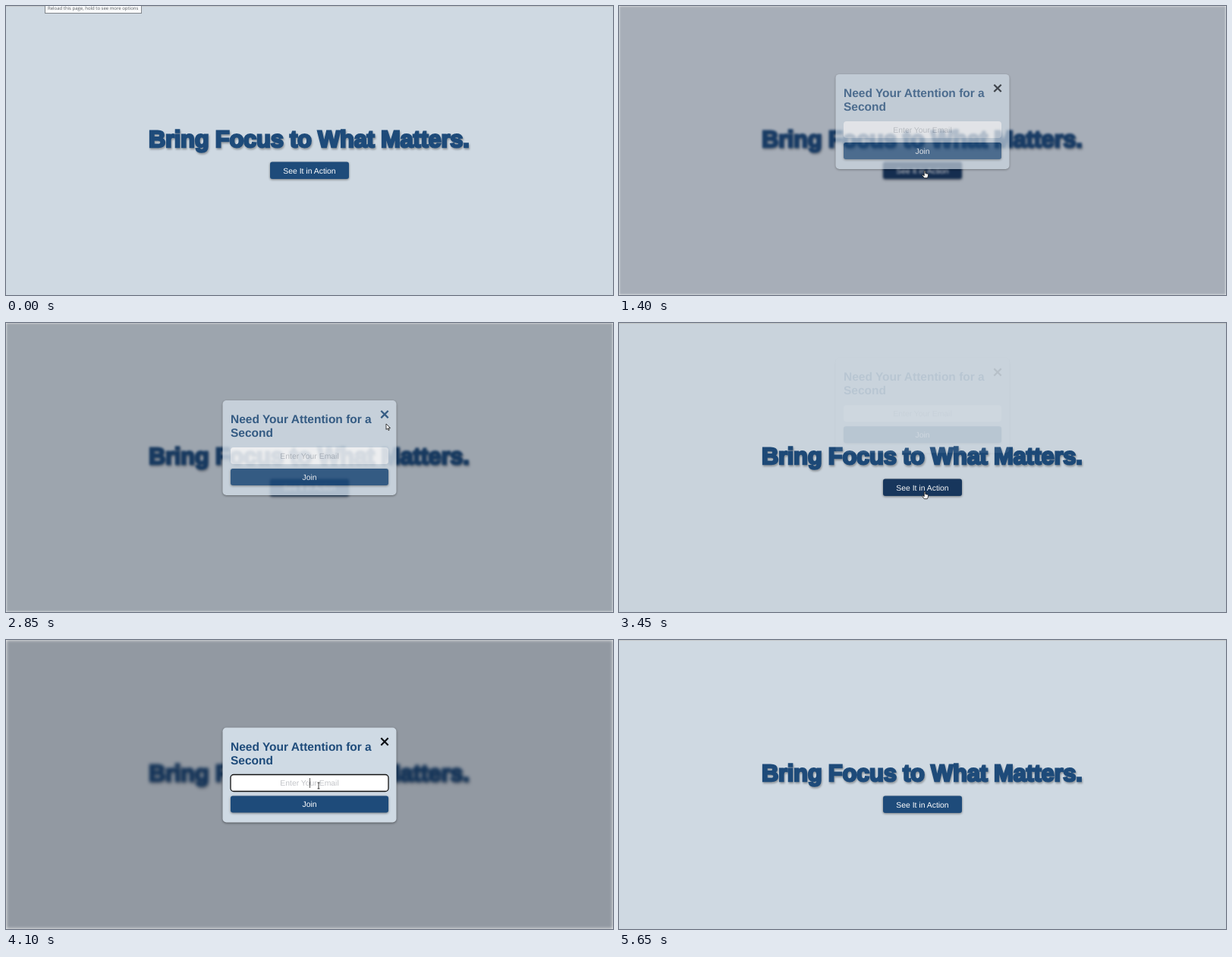
Recreate the animation shown at these times as an HTML page. Size 800 px wide and 381 px high, loop 5.7 s.

```html
<!DOCTYPE html>
<html lang="en">
<head>
<meta charset="utf-8">
<title>Focus modal</title>
<style>
  html, body { margin: 0; width: 100%; height: 100%; overflow: hidden; background: #fff; }
  svg { display: block; width: 800px; height: 381px; }
  text { font: 10.4px "Liberation Sans", Arial, sans-serif; text-rendering: geometricPrecision; }
  .mid { text-anchor: middle; }
  .title { font-size: 31px; font-weight: bold; letter-spacing: -.28px; fill: #1e4b7a; stroke: #1e4b7a;
           stroke-width: 2.4px; filter: drop-shadow(1px 2px 1px rgba(0,0,0,.3)); }
  .button { filter: drop-shadow(0 1px 1.5px rgba(0,0,0,.45)); }
  .heading { font-size: 15.5px; font-weight: bold; fill: #1e4b7a; }
  .tip { font: 6px "Open Sans", "Noto Sans", sans-serif; fill: #555b61; }
  .cursor path { fill: #fff; stroke: #111; stroke-width: .8; stroke-linejoin: round; }
</style>
</head>
<body>
<svg viewBox="0 0 800 381">
  <g id="page">
    <rect width="800" height="381" fill="#cfd9e2"/>
    <rect width="800" height="1" fill="#c4c8ca"/>
    <text class="title" x="187.9" y="186">Bring Focus to What Matters.</text>
    <rect id="action" class="button" x="348" y="205.5" width="104" height="22.5" rx="3"/>
    <text class="mid" x="400" y="220.6" fill="#fff">See It in Action</text>
    <rect id="shade" width="800" height="381" fill="#060410"/>
  </g>
  <g id="modal">
    <rect class="button" x="285.5" y="115.5" width="229" height="125" rx="5" fill="#cfdae4"/>
    <text class="heading" x="296" y="145.6">Need Your Attention for a</text>
    <text class="heading" x="296" y="163.6">Second</text>
    <path id="close" d="M494.3 129.3l9.4 9.4m0-9.4l-9.4 9.4" stroke-width="2.2"/>
    <rect id="field" x="296" y="177.5" width="208" height="22" rx="4" fill="#fff" stroke="#111"/>
    <text class="mid" x="400" y="192.4" fill="#c2c4c8">Enter Your Email</text>
    <path id="caret" d="M400.5 182v13" stroke="#333" stroke-width=".8"/>
    <rect id="join" class="button" x="296" y="205.5" width="208" height="22" rx="3"/>
    <text class="mid" x="400" y="220.3" fill="#fff">Join</text>
  </g>
  <g id="tip">
    <rect x="51.5" y="-6" width="127" height="15.5" fill="#f8f9fa" stroke="#82878c"/>
    <text class="tip" x="55" y="5.3">Reload this page, hold to see more options</text>
  </g>
  <g id="cursor" class="cursor">
    <path id="arrow" d="M0 0v7.5l1.8-1.6 1.2 2.7 1.3-.6-1.2-2.6h2.4z"/>
    <path id="hand" d="M-.8 .6q.8-1.2 1.6 0v3l3 .7q.9.3.8 1.4l-.5 2.5-.8 1.6h-4l-2.6-3.4q.2-1.2 1.2-.6l1.3 1z"/>
    <path id="beam" d="M-1.5 0h3m-1.5 0v8m-1.5 0h3"/>
  </g>
</svg>
<script>
const LOOP = 5700, FADE = 300, RISE = 76;
const NAVY = '#1e4b7a', DARK = '#18385f';
const opens = [[1285, 2807], [3422, 4980]];
const focus = [4050, 4960];
// time, x, y of the pointer tip
const path = [
  [200, 62, -12], [600, 330, 246], [950, 403, 217], [1950, 403, 217],
  [2350, 501, 132], [2900, 501, 133], [3300, 403, 222], [3620, 403, 222],
  [3820, 440, 312], [4020, 412, 188], [4250, 412, 188], [4450, 470, 303],
  [4750, 499, 138], [5080, 499, 138], [5400, 430, -15]
];
const $ = id => document.getElementById(id);
const clamp = v => Math.min(1, Math.max(0, v));
const show = (id, on) => $(id).style.display = on ? '' : 'none';
const within = (v, a, b) => v >= a && v < b;

// CSS "ease": cubic-bezier(.25, .1, .25, 1)
function ease(x) {
  if (x <= 0 || x >= 1) return clamp(x);
  let lo = 0, hi = 1;
  for (let i = 0; i < 20; i++) {
    const s = (lo + hi) / 2;
    if (.75 * s * (1 - s) + s ** 3 < x) lo = s; else hi = s;
  }
  return .3 * lo * (1 - lo) ** 2 + 3 * lo * lo * (1 - lo) + lo ** 3;
}

function pointer(t) {
  const i = path.findIndex(k => k[0] > t);
  if (i <= 0) return (i ? path.at(-1) : path[0]).slice(1);
  const [a, b] = [path[i - 1], path[i]];
  const u = (t - a[0]) / (b[0] - a[0]), s = u * u * (3 - 2 * u);
  return [1, 2].map(k => a[k] + (b[k] - a[k]) * s);
}

function draw(t) {
  const p = opens.reduce((sum, [on, off]) =>
    sum + ease((t - on) / FADE) - ease((t - off) / FADE), 0);
  const [x, y] = pointer(t), open = p > .001;

  $('page').style.filter = open ? `blur(${2.1 * p}px)` : 'none';
  $('shade').setAttribute('fill-opacity', .3 * p);
  $('modal').setAttribute('opacity', p);
  $('modal').setAttribute('transform', `translate(0 ${-RISE * (1 - p)})`);

  const inRow = within(y, 205, 228);
  const onAction = inRow && within(x, 348, 452);
  const onJoin = open && inRow && within(x, 296, 504);
  const onField = open && within(y + 4, 177, 200) && within(x, 296, 504);
  const onClose = open && within(x, 490, 508) && within(y, 125, 145);
  $('action').setAttribute('fill', onAction ? DARK : NAVY);
  $('join').setAttribute('fill', onJoin && p > .95 ? DARK : NAVY);
  $('close').setAttribute('stroke', onClose ? NAVY : '#0b0f14');

  const focused = within(t, ...focus);
  $('field').setAttribute('stroke-width', focused ? 1.3 : 0);
  show('caret', focused && (t - focus[0]) % 1000 < 500);

  $('tip').setAttribute('opacity', clamp((350 - t) / 150));
  $('cursor').setAttribute('transform', `translate(${x} ${y})`);
  const hand = onAction || onJoin;
  show('hand', hand);
  show('beam', onField && !hand);
  show('arrow', !hand && !onField);
}

const start = performance.now();
(function tick() {
  draw((performance.now() - start) % LOOP);
  requestAnimationFrame(tick);
})();
</script>
</body>
</html>
```
